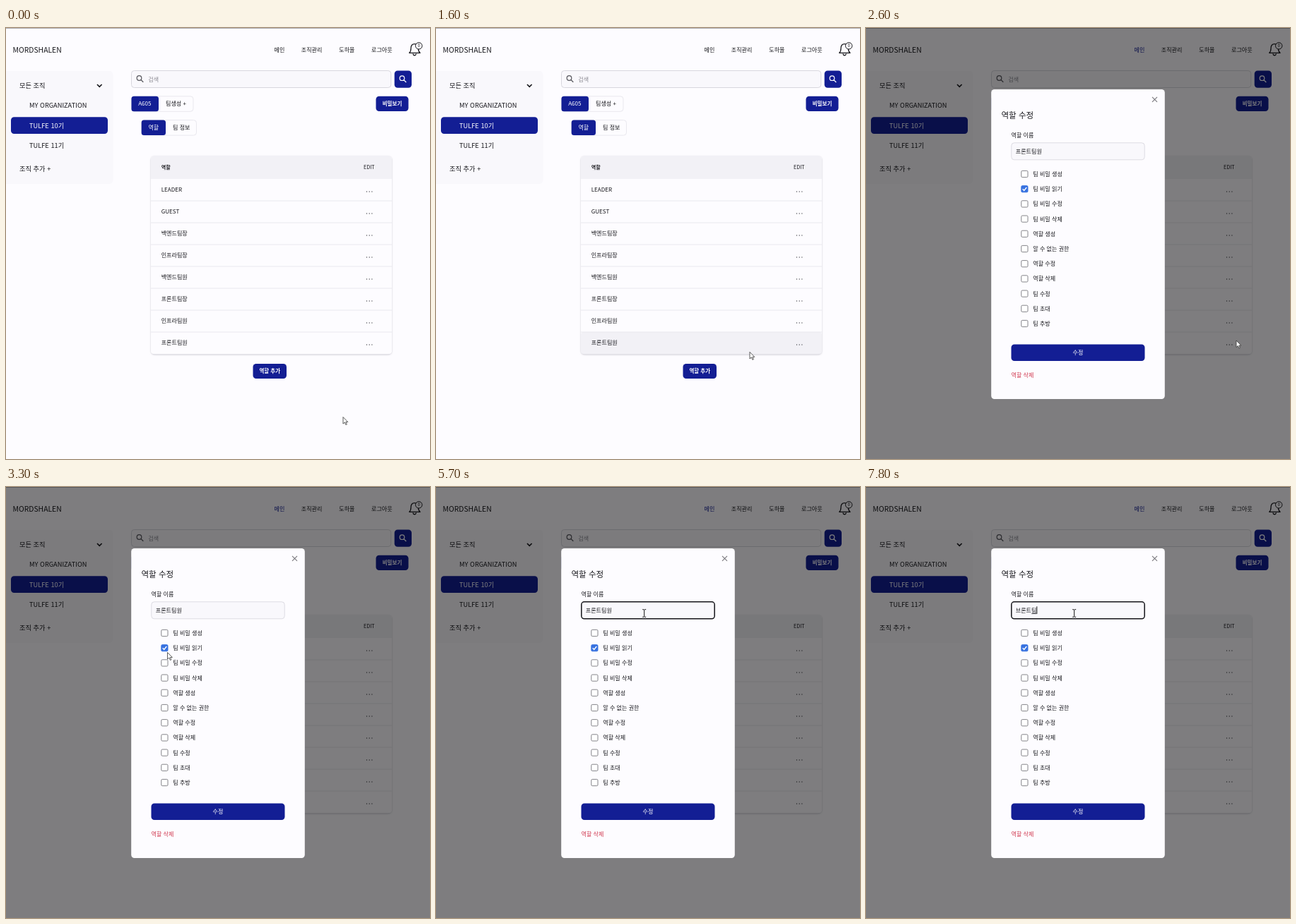
Animation of 600x611 px, one loop 8 s. Source, as an HTML page:

```html
<!DOCTYPE html>
<html lang="ko">
<head>
<meta charset="utf-8">
<style>
html, body { margin: 0; width: 100%; height: 100%; overflow: hidden; background: #fdfcff; }
svg { display: block; width: 600px; height: 611px; }
text { font-family: "Noto Sans CJK KR", "Noto Sans CJK", "Noto Sans CJK JP", sans-serif; white-space: pre; }
</style>
</head>
<body>
<svg id="stage" viewBox="0 0 600 611"></svg>
<script>
const NAVY = '#131e94', INK = '#17171c', PALE = '#f9f8fc', HEAD = '#f2f1f6', PAGE = '#fdfcff', LINE = '#e9e8ee';
const LOOP = 8000;

const rect = (x, y, x2, y2, r, fill, extra = '') =>
  `<rect x="${x}" y="${y}" width="${x2 - x}" height="${y2 - y}" rx="${r}" fill="${fill}" ${extra}/>`;
const text = (x, y, s, size = 8.05, fill = INK, extra = '') =>
  `<text x="${x}" y="${y}" font-size="${size}" fill="${fill}" ${extra}>${s}</text>`;
const path = (d, stroke, width = 1, fill = 'none', extra = '') =>
  `<path d="${d}" stroke="${stroke}" stroke-width="${width}" fill="${fill}" ${extra}/>`;
const button = (x, y, x2, y2, label) => rect(x, y, x2, y2, 4.5, NAVY) +
  text((x + x2) / 2, (y + y2) / 2 + 2.8, label, 7.5, '#fff', 'font-weight="700" text-anchor="middle"');
const lens = (x, y, color) =>
  `<circle cx="${x - 1}" cy="${y - 1}" r="3.3" fill="none" stroke="${color}" stroke-width="1.2"/>` +
  path(`M${x + 1.4} ${y + 1.4}l3.4 3.4`, color, 1.3);
const tabs = (x, mid, x2, y, on, off) =>
  rect(x, y, x2, y + 21.5, 4, PAGE, `stroke="${LINE}"`) + rect(x, y, mid, y + 21.5, 3.5, NAVY) +
  text(x + 9.7, y + 13.6, on, 8.05, '#fff') + text(mid + 10, y + 13.6, off);

const roles = ['LEADER', 'GUEST', '백엔드팀장', '인프라팀장', '백엔드팀원', '프론트팀장', '인프라팀원', '프론트팀원'];
const rights = ['팀 비밀 생성', '팀 비밀 읽기', '팀 비밀 수정', '팀 비밀 삭제', '역할 생성', '알 수 없는 권한',
  '역할 수정', '역할 삭제', '팀 수정', '팀 초대', '팀 추방'];

const header = text(9.5, 34.9, 'MORDSHALEN', 10.4, INK, 'font-weight="500"') +
  text(379.5, 34, '메인', 8.05, INK, 'id="home"') + text(417.8, 34, '조직관리') +
  text(471.3, 34, '도하율') + text(517, 34, '로그아웃') +
  path('M570.7 35.3c2.2-1.8 2.3-3.6 2.3-6.3 0-3.9 2-6.4 5.2-6.4s5.2 2.5 5.2 6.4c0 2.7.2 4.5 2.6 6.3z', INK, 1.3, 'none', 'stroke-linejoin="round"') +
  path('M576 36.5c.3 3 4 3 4.4 0', INK, 1.3) +
  `<circle cx="584.2" cy="25.3" r="4.7" fill="${PAGE}" stroke="${INK}"/>` +
  text(584.2, 27.4, '0', 5.6, INK, 'text-anchor="middle"');

const sidebar = rect(-6, 61, 151.5, 221, 5, PALE) + text(19, 84.7, '모든 조직', 9.25) +
  path('M129 80l3.3 3.4 3.3-3.4', INK, 1.6) + text(33, 113.2, 'MY ORGANIZATION', 9.25) +
  rect(7, 126.3, 144, 150, 4.5, NAVY) + text(33, 141.5, 'TULFE 10기', 9.25, '#fff') +
  text(33, 169.8, 'TULFE 11기', 9.25) + text(19, 202.5, '조직 추가 +', 9.25);

const toolbar = rect(177.5, 60.5, 544.8, 84.5, 4, PALE, 'stroke="#d8d7de"') + lens(189.5, 72, '#55555c') +
  text(201.3, 75.5, '검색', 8.05, '#8b8a92') + rect(549.7, 60.5, 574, 84.8, 4.5, NAVY) + lens(561.5, 72.2, '#fff') +
  tabs(177.5, 216, 265, 96.8, 'A605', '팀생성 +') + button(523.5, 96.8, 569.5, 118, '비밀보기') +
  tabs(191.7, 226, 269.5, 130.6, '역할', '팀 정보');

const row = (name, i) => {
  const y = 214 + 31 * i;
  return rect(205, y, 546, y + 31, i == 7 ? 4 : 0, PAGE, 'class="row"') +
    (i ? path(`M205 ${y}H546`, LINE) : '') + text(219.7, y + 18.3, name) +
    `<g class="more" fill="#44444a">` + [510.5, 514.2, 517.9].map(x =>
      `<circle cx="${x}" cy="${y + 18}" r=".65"/>`).join('') +
    path(`M509 ${y + 20.5}h10.3`, NAVY, .8, 'none', 'class="under"') + '</g>';
};
const table = rect(205, 182, 546, 463.3, 5, '#c9c8d0', 'filter="url(#soft)"') +
  rect(205, 181, 546, 462.3, 5, PAGE) + path('M205 214v-28a5 5 0 0 1 5-5H541a5 5 0 0 1 5 5v28z', 'none', 0, HEAD) +
  text(219.7, 199.7, '역할', 7, INK, 'font-weight="700"') + text(506, 200.2, 'EDIT', 7.2, INK, 'font-weight="500"') +
  roles.map(row).join('') + button(349.5, 476, 397, 497, '역할 추가');

const option = (label, i) => {
  const y = 207 + 21.2 * i, on = i == 1;
  return rect(219.8, y - 4.6, 229, y + 4.6, 1.5, on ? '#3772e0' : '#fff', `stroke="${on ? '#3772e0' : '#77767c'}" stroke-width=".9"`) +
    (on ? path(`M221.7 ${y}l2 2.2 3.6-4.4`, '#fff', 1.4) : '') + text(236.3, y + 2.9, label);
};
const modal = `<g id="modal">` + rect(0, 0, 600, 611, 0, '#000', 'opacity=".5"') +
  rect(177.2, 87, 422.8, 526, 4.5, PAGE) + path('M405 97.8l7 7m0-7l-7 7', '#77767c', 1.1) +
  text(191.5, 128, '역할 수정', 11.56) + text(205.5, 154.8, '역할 이름') +
  rect(205.8, 162.8, 394.2, 186.8, 4, PALE, 'id="field"') + text(211.8, 177.5, '', 8.05, INK, 'id="value"') +
  path('', INK, .7, 'none', 'id="compose"') + path('', '#000', .9, 'none', 'id="caret"') +
  rights.map(option).join('') + rect(205.5, 448.5, 394.5, 472, 4.5, NAVY) +
  text(300, 463.2, '수정', 8.05, '#fff', 'font-weight="500" text-anchor="middle"') +
  text(205.5, 494.8, '역할 삭제', 8.05, '#d0354c') + '</g>';

const pointer = path('M0 0V9.6L2.3 7.5 3.9 11 5.4 10.3 3.9 7H6.8Z', '#333', .8, '#fff', 'id="arrow"') +
  path('M-2.5-5.3H-.7L0-4.7.7-5.3H2.5M0-4.7V4.7M-2.5 5.3H-.7L0 4.7.7 5.3H2.5', '#111', 1, 'none', 'id="beam"');

const $ = id => document.getElementById(id);
const set = (el, attrs) => { for (const k in attrs) el.setAttribute(k, attrs[k]); };
$('stage').innerHTML =
  '<filter id="soft" x="-5%" y="-5%" width="110%" height="110%"><feGaussianBlur stdDeviation="1.2"/></filter>' +
  header + path('M0 .5H600', '#aeadb2') + sidebar + toolbar + table + modal + pointer;
const rowEls = document.querySelectorAll('.row'), moreEls = document.querySelectorAll('.more');

// Pointer stops: time, x, y
const route = [[0, 477, 551.5], [800, 278, 552.5], [900, 283, 527], [1800, 490, 440], [2300, 523, 443], [2600, 524, 443],
  [2700, 385, 429], [3100, 163, 290], [3500, 294, 179], [3600, 294, 179], [3700, 294.7, 179]];
// Field edits: time, text, whether the last syllable is still being composed
const edits = [[0, '프론트팀원'], [5800, '프론트팀'], [6000, '프론트'], [6100, '프론'], [6300, '프'], [6400, ''],
  [6600, 'ㅂ', 1], [6700, '브', 1], [6800, '블', 1], [7000, '브로', 1], [7100, '브론', 1], [7200, '브론ㅌ', 1],
  [7300, '브론트', 1], [7400, '브론틑', 1], [7500, '브론트티', 1], [7800, '브론트팀', 1]];

function pointerAt(t) {
  const i = route.findIndex(p => p[0] > t);
  if (i < 0) return route.at(-1).slice(1);
  const [a, b] = [route[i - 1], route[i]], k = (t - a[0]) / (b[0] - a[0]);
  return [1, 2].map(n => a[n] + (b[n] - a[n]) * k);
}

function draw(t) {
  const open = t >= 2600, focus = t >= 4100, [x, y] = pointerAt(t);
  const beam = t >= 3500;
  $('modal').style.display = open ? '' : 'none';
  $('home').setAttribute('fill', open ? NAVY : INK);
  const inTable = !open && x > 205 && x < 546;
  rowEls.forEach((el, i) => {
    const top = 214 + 31 * i, hot = inTable && y >= top && y < top + 31, link = hot && x > 503 && x < 527;
    el.setAttribute('fill', hot ? HEAD : PAGE);
    moreEls[i].setAttribute('fill', link ? NAVY : '#44444a');
    moreEls[i].querySelector('.under').style.display = link ? '' : 'none';
  });
  $('arrow').style.display = beam ? 'none' : '';
  $('beam').style.display = beam ? '' : 'none';
  set($(beam ? 'beam' : 'arrow'), { transform: `translate(${x} ${y})` });

  const [, value, composing] = edits.filter(e => e[0] <= t).at(-1);
  const end = 211.8 + value.length * 7.4;
  const blinkOff = t >= 4600 && t < 5200 || t >= 5700 && t < 5800;
  $('value').textContent = value;
  set($('field'), { stroke: focus ? '#151519' : '#dddce3', 'stroke-width': focus ? 1.5 : 1 });
  set($('caret'), { d: focus && !blinkOff ? `M${end + .4} 169.3v10.6` : '' });
  set($('compose'), { d: composing ? `M${end - 7.2} 179.6h7` : '' });
}

function tick() {
  draw(Math.floor(performance.now() % LOOP / 100) * 100);
  requestAnimationFrame(tick);
}
tick();
</script>
</body>
</html>
```
